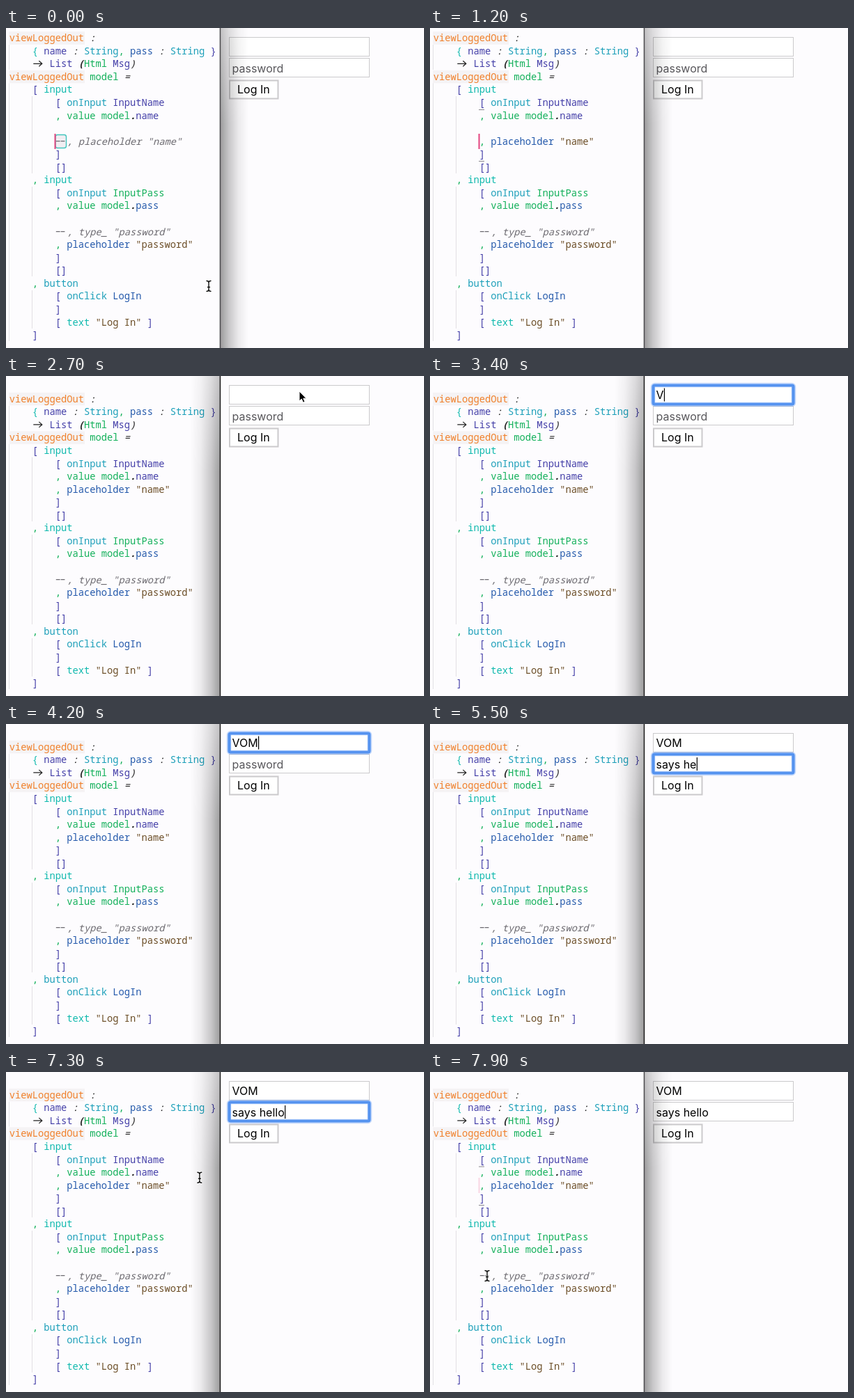
An HTML page for the animation above (8 s loop, 600 by 460 pixels).

```html
<!DOCTYPE html>
<html lang="en">
<head>
<meta charset="utf-8">
<title>Login form live edit</title>
<style>
  html, body { margin: 0; width: 100%; height: 100%; overflow: hidden; background: #fdfcfe; }
  svg { display: block; width: 600px; height: 460px; }
  text { white-space: pre; }
  .code text { font: 13.75px "Noto Sans Mono", "DejaVu Sans Mono", monospace; }
  .code .op { font-style: italic; }
  .code .strong { font-style: italic; font-weight: 600; }
  .code .comment { font-style: italic; }
  .guide { stroke: #e2e0e4; fill: none; }
  .form text { font: 16px Inter, "Liberation Sans", sans-serif; }
  .box { fill: #fff; stroke: #cbcacc; }
</style>
</head>
<body>
<svg viewBox="0 0 600 460">
  <defs>
    <linearGradient id="shadeRight">
      <stop offset="0" stop-opacity=".38"/>
      <stop offset=".3" stop-opacity=".21"/>
      <stop offset=".65" stop-opacity=".07"/>
      <stop offset="1" stop-opacity="0"/>
    </linearGradient>
    <linearGradient id="shadeLeft" href="#shadeRight" x1="1" x2="0"/>
    <linearGradient id="fade" x2="0" y2="1">
      <stop offset="0" stop-color="#fff" stop-opacity=".6"/>
      <stop offset=".3" stop-color="#fff"/>
    </linearGradient>
    <mask id="topFade"><rect width="600" height="460" fill="url(#fade)"/></mask>
  </defs>
  <rect width="600" height="460" fill="#fdfcfe"/>

  <g class="code">
    <g id="upper">
      <path class="guide" d="M4.5 24V60M4.5 79V154M37.5 98V154"/>
      <path id="openMark" d="M70 117.5h8" stroke="#88868c"/>
    </g>
    <g id="lower">
      <path class="guide" d="M4.5 154V450M37.5 154V209M37.5 228V357M37.5 377V432"/>
      <path id="closeMark" d="M70 191.5h8" stroke="#88868c"/>
    </g>
    <g id="commented">
      <rect x="71" y="153.5" width="15.5" height="19" rx="3" fill="#f1eef2" stroke="#43c5bd" stroke-width="1.4"/>
    </g>
    <g id="active"></g>
    <rect id="editorCaret" x="69.5" y="152" width="2" height="22" fill="#e4437f"/>
  </g>

  <g class="form">
    <rect class="box" x="320.5" y="13.5" width="201" height="27"/>
    <rect class="box" x="320.5" y="43.5" width="201" height="27"/>
    <rect class="box" x="321" y="75.5" width="69.5" height="26" stroke-width="2"/>
    <text x="332" y="94">Log In</text>
    <g id="ring" fill="none" stroke="#4b8df0">
      <rect x="320" y="0" width="202" height="28" rx="2.5" stroke-width="6.5" opacity=".3"/>
      <rect x="320.5" y="0.5" width="201" height="27" rx="2" stroke-width="4.2" opacity=".9"/>
    </g>
    <text id="nameText" x="324.5" y="33"></text>
    <text id="passText" x="324.5" y="64"></text>
    <rect id="fieldCaret" width="1.2" height="19"/>
  </g>

  <g mask="url(#topFade)">
    <rect id="editorShadow" x="308" width="40" height="460" fill="url(#shadeRight)"/>
    <rect id="browserShadow" x="265" width="42" height="460" fill="url(#shadeLeft)"/>
  </g>
  <rect id="divider" x="306.7" width="1.5" height="460"/>

  <path id="arrow" d="M0 0V14L3.3 11 5.6 16.2 8 15.1 5.8 10.2H10Z" stroke="#fff" stroke-width="1"/>
  <g id="beam" fill="none" stroke-linecap="round">
    <path d="M-3-7.5Q0-7.5 0-5V5Q0 7.5-3 7.5M3-7.5Q0-7.5 0-5M0 5Q0 7.5 3 7.5M-1.5 1.5h3" stroke="#fff" stroke-width="3"/>
    <path d="M-3-7.5Q0-7.5 0-5V5Q0 7.5-3 7.5M3-7.5Q0-7.5 0-5M0 5Q0 7.5 3 7.5M-1.5 1.5h3" stroke="#111" stroke-width="1.4"/>
  </g>
</svg>

<script>
const LOOP = 8000, STEP = 100, ROW = 18.56, COL = 8.25;
const $ = id => document.getElementById(id);

const palette = {
  orange: '#f0802b', cyan: '#1c9fb9', teal: '#10b9ae', green: '#12b05a',
  indigo: '#443fa8', blue: '#2459ab', brown: '#6b4d26', grey: '#6c6a70', black: '#222'
};
const words = {
  orange: 'viewLoggedOut', cyan: 'String onInput button onClick',
  teal: 'input text {', green: 'Html model value InputPass ,',
  indigo: 'List Msg InputName name [ ] }', blue: 'pass placeholder LogIn', black: ': = . ( )'
};
const colorOf = {};
for (const key in words) for (const word of words[key].split(' ')) colorOf[word] = palette[key];

const lines = `viewLoggedOut :
    { name : String, pass : String }
    -> List (Html Msg)
viewLoggedOut model =
    [ input
        [ onInput InputName
        , value model.name

        , placeholder "name"
        ]
        []
    , input
        [ onInput InputPass
        , value model.pass

        --, type_ "password"
        , placeholder "password"
        ]
        []
    , button
        [ onClick LogIn
        ]
        [ text "Log In" ]
    ]`.split('\n');
const EDIT_ROW = 8;

function add(parent, tag, attrs, content = '') {
  const node = document.createElementNS('http://www.w3.org/2000/svg', tag);
  for (const key in attrs) node.setAttribute(key, attrs[key]);
  node.textContent = content;
  parent.append(node);
}

function tokenClass(token) {
  if (/[.(]/.test(token)) return 'strong';
  return /^[:=)]$/.test(token) ? 'op' : '';
}

function drawLine(parent, line, row) {
  const y = 19.2 + row * ROW, xAt = col => 4.8 + col * COL;
  const comment = line.indexOf('--');
  if (comment >= 0) {
    const x = xAt(comment);
    add(parent, 'path', { d: `M${x + 1} ${y - 5}h5.8m1 0h5.8`, stroke: palette.grey, 'stroke-width': 1.3 });
    add(parent, 'text', { x: xAt(comment + 2), y, class: 'comment', fill: palette.grey }, line.slice(comment + 2));
    return;
  }
  for (const match of line.matchAll(/"[^"]*"|\w+|->|\S/g)) {
    const token = match[0], x = xAt(match.index);
    if (token === '->') {
      add(parent, 'path', {
        d: `M${x + 1.5} ${y - 5}h12.5m-4.5-4l4.5 4-4.5 4`,
        fill: 'none', stroke: palette.black, 'stroke-width': 1.2
      });
      continue;
    }
    if (token === 'viewLoggedOut')
      add(parent, 'rect', { x: 4, y: y - 14, width: 109, height: ROW, fill: '#f5f3f5' });
    const fill = token[0] === '"' ? palette.brown : colorOf[token];
    add(parent, 'text', { x, y, fill, class: tokenClass(token) }, token);
  }
}

lines.forEach((line, row) => {
  const group = row < EDIT_ROW ? 'upper' : row === EDIT_ROW ? 'active' : 'lower';
  drawLine($(group), line, row);
});
drawLine($('commented'), '        --, placeholder "name"', EDIT_ROW);

const during = (t, from, to) => t >= from && t < to;
const show = (id, visible) => $(id).style.display = visible ? '' : 'none';
const typed = (text, times, t) => text.slice(0, times.filter(at => at <= t).length);

// Pointer stops: time, x, y
const stops = [
  [0, 291, 371], [1600, 291, 371], [1800, 375, 215], [2200, 430, 50], [2500, 421, 22],
  [6700, 421, 22], [7000, 405, 60], [7700, 82, 293], [8000, 82, 293]
];
function pointerAt(t) {
  const next = Math.max(1, stops.findIndex(stop => stop[0] > t));
  const [t0, x0, y0] = stops[next - 1], [t1, x1, y1] = stops[next];
  const u = (t - t0) / (t1 - t0), eased = u * u * (3 - 2 * u);
  return [x0 + (x1 - x0) * eased, y0 + (y1 - y0) * eased];
}

function render(t) {
  const uncommented = t >= 500, joined = t >= 1500;
  const inBrowser = during(t, 2500, 7500), focused = during(t, 3000, 7500);
  const onPass = t >= 4400;

  $('upper').setAttribute('transform', `translate(0 ${joined ? ROW : 0})`);
  show('commented', !uncommented);
  show('active', uncommented);
  show('openMark', uncommented && !inBrowser);
  show('closeMark', uncommented && !inBrowser);
  show('editorCaret', !inBrowser);
  $('editorCaret').style.opacity = t >= 7900 ? 0.2 : 1;

  show('editorShadow', !inBrowser);
  show('browserShadow', inBrowser);
  $('divider').setAttribute('fill', inBrowser ? '#1c1c1c' : '#4a494c');

  const name = typed('VOM', [3400, 3600, 3800], t);
  const pass = typed('says hello', [4700, 4800, 4900, 5100, 5200, 5300, 5500, 5600, 5800, 5900], t);
  $('nameText').textContent = name;
  $('passText').textContent = pass || 'password';
  $('passText').setAttribute('fill', pass ? '#000' : '#58575b');

  show('ring', focused);
  $('ring').setAttribute('transform', `translate(0 ${onPass ? 43 : 13})`);
  const value = onPass ? pass : name;
  const width = value ? $(onPass ? 'passText' : 'nameText').getComputedTextLength() : 0;
  show('fieldCaret', focused && !during(t, 6500, 7000));
  $('fieldCaret').setAttribute('x', 324.8 + width);
  $('fieldCaret').setAttribute('y', onPass ? 48 : 17.5);

  const [x, y] = pointerAt(t);
  const visible = t < 500 || during(t, 1700, 3400) || t >= 6900;
  const isBeam = x < 305 || (focused && y < 71);
  show('beam', visible && isBeam);
  show('arrow', visible && !isBeam);
  for (const id of ['beam', 'arrow']) $(id).setAttribute('transform', `translate(${x} ${y})`);
}

const start = performance.now();
function tick() {
  const t = (performance.now() - start) % LOOP;
  render(Math.floor(t / STEP) * STEP);
  requestAnimationFrame(tick);
}
tick();
</script>
</body>
</html>
```
